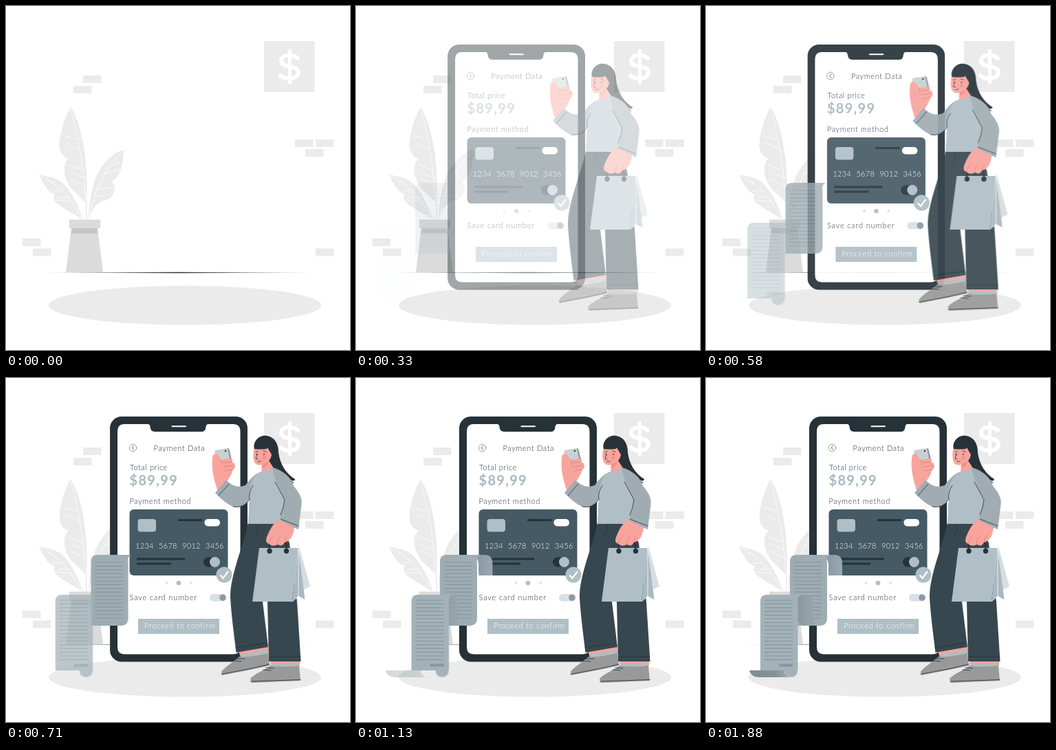
Recreate the animation shown at these times as an HTML page. Size 500 by 500 pixels, loop 1.93 s.

```html
<!DOCTYPE html>
<html lang="en">
<head>
<meta charset="utf-8">
<title>Payment</title>
<style>
html, body { margin: 0; width: 100%; height: 100%; overflow: hidden; background: #fff; }
svg { display: block; width: 100vw; height: 100vh; }
text { font: 300 11px Lato, "Open Sans", sans-serif; fill: #263238; }
.pale { fill: #ebebeb; }
.dark { fill: #263238; }
.blue { fill: #b0bec5; }
.skin { fill: #f8a49c; }
.paper { fill: #a3b2b9; }
.ink { fill: none; stroke: #263238; stroke-linecap: round; stroke-linejoin: round; stroke-width: .8; }
.vein { fill: none; stroke: #fff; stroke-width: .7; stroke-linecap: round; }
.rows { fill: none; stroke: #8797a0; stroke-width: 1.2; }
</style>
</head>
<body>
<svg viewBox="0 0 500 500">
  <defs>
    <linearGradient id="floor">
      <stop offset="0" stop-color="#263238" stop-opacity=".3"/>
      <stop offset=".5" stop-color="#263238"/>
      <stop offset="1" stop-color="#263238" stop-opacity=".3"/>
    </linearGradient>
    <linearGradient id="fold">
      <stop offset="0" stop-color="#84929a"/>
      <stop offset="1" stop-color="#9aa9b1"/>
    </linearGradient>
    <linearGradient id="roll">
      <stop offset="0" stop-color="#7d8b93"/>
      <stop offset=".6" stop-color="#83929a"/>
      <stop offset="1" stop-color="#a4b3ba"/>
    </linearGradient>
  </defs>

  <g id="bricks" class="pale"></g>
  <path class="pale" d="M375 51h73.500v74h-73.500z"/>
  <g fill="none" stroke="#fff" stroke-width="6" stroke-linecap="round">
    <path d="M424 76C416 69 400 70 400 80C400 91 425 85 425 96C425 107 407 108 399 101"/>
    <path stroke-width="5" d="M412.500 65V111"/>
  </g>
  <ellipse class="pale" cx="260" cy="435" rx="198" ry="28.500"/>

  <g id="plant">
    <path class="pale" d="M94 147C83 165 76 195 78 207C80 217 86 220 91 222C83 228 83 245 90 257C95 270 109 275 117 288C119 260 117 220 110 190C106 170 99 155 94 147"/>
    <path class="pale" d="M48 245C56 262 62 272 71 273Q67 277 72 285C85 296 100 302 112 311C104 285 90 262 78 254C68 248 56 247 48 245"/>
    <path class="pale" d="M171 209C155 213 138 230 130 250C124 270 120 290 120 311C124 295 132 285 145 282C153 280 158 273 158 262Q152 255 158 252C166 246 171 228 171 209"/>
    <path fill="none" stroke="#ebebeb" stroke-width="1.500" d="M117 284V312"/>
    <path class="vein" d="M94 150C104 185 114 235 116 290M83 188L103 194M88 199L107 208M91 231L113 239M94 251L115 262M96 242L114 250"/>
    <path class="vein" d="M50 247C75 257 98 284 110 309M68 269L83 268M72 282L96 284M75 278L92 278M62 254L71 257"/>
    <path class="vein" d="M169 212C145 232 127 272 121 306M142 244L165 237M146 236L166 226M132 267L155 263M129 277L148 275"/>
    <path fill="#dbdbdb" d="M92 310.500h45v12.500h-45zM95 322h38l8 65H87z"/>
    <path fill="#c5c5c5" d="M96 323h36l1.500 7.500H94.500z"/>
  </g>
  <path fill="url(#floor)" d="M55 387.500L250 386.700L445 387.500L250 388.300z"/>

  <g id="phone">
    <rect class="dark" x="150" y="56" width="200" height="356.500" rx="17"/>
    <path fill="#fff" d="M171 67H205Q208 67 208.500 71Q209 78 215 78H284Q289 78 289.500 71Q290 67 293 67H329Q339.500 67 339.500 78V391Q339.500 401.500 329 401.500H171Q161 401.500 161 391V78Q161 67 171 67z"/>
    <path d="M240.500 70.300H260" stroke="#fff" stroke-width="2" stroke-linecap="round"/>
    <circle class="ink" cx="183.500" cy="101.500" r="5.300" style="stroke:#78868d"/>
    <path class="ink" d="M184.800 98.800L182 101.500L184.800 104.200"/>
    <text x="213.500" y="105.500" letter-spacing=".65">Payment Data</text>
    <text x="179" y="133.500" letter-spacing=".55">Total price</text>
    <text x="178.500" y="155.500" letter-spacing="1.300" style="font-size:20px;font-weight:700;fill:#a9b8c0">$89,99</text>
    <text x="178.500" y="183" letter-spacing=".62">Payment method</text>
    <rect x="178.500" y="191" width="143" height="96" rx="6" fill="#455a64"/>
    <rect class="blue" x="190.500" y="205" width="26.500" height="18.500" rx="4"/>
    <rect x="287.500" y="205" width="22.500" height="10.500" rx="5" fill="#fff"/>
    <path class="ink" style="stroke-width:3;stroke-linecap:butt" d="M249 206.500H284M189 263H259M189 270H239"/>
    <text x="187" y="247.500" letter-spacing=".3" word-spacing="4" style="fill:#fff">1234 5678 9012 3456</text>
    <rect class="dark" x="286" y="260.500" width="24" height="14" rx="7"/>
    <circle class="blue" cx="302.500" cy="267.500" r="7.500"/>
    <circle class="blue" cx="316" cy="286" r="11.500"/>
    <path d="M310.500 286.500L314.500 291L322 281" fill="none" stroke="#fff" stroke-width="2.200"/>
    <circle fill="#e3e6e8" cx="232.500" cy="298" r="2.300"/>
    <circle class="blue" cx="250" cy="298" r="3.300"/>
    <circle fill="#e3e6e8" cx="268" cy="298" r="2.300"/>
    <text x="178.500" y="323" letter-spacing=".85">Save card number</text>
    <rect x="295" y="314" width="24" height="10.500" rx="5.200" fill="#d9e0e4"/>
    <circle cx="314" cy="319.200" r="4.800" fill="#8b9ba3"/>
    <path class="blue" d="M191 350h118v22H191z"/>
    <text x="200" y="364" letter-spacing=".7" style="fill:#fff">Proceed to confirm</text>
  </g>

  <g id="receipt">
    <path id="topFold" fill="url(#fold)" d="M166 257H188Q198 258 198 270V287H178V270Q177 260 166 257z"/>
    <g id="backPage">
      <path fill="#9eacb3" d="M131 257H180Q174 260 176 270V349Q176 360 165 360H122V267Q122 257 131 257z"/>
      <path class="rows" id="backRows"/>
    </g>
    <path id="midFold" fill="url(#fold)" d="M122 315H146Q155 316 156 328V352Q156 358 161 360H143Q134 358 133 350V326Q131 317 122 315z"/>
    <path id="scroll" fill="url(#roll)" d="M63 425H114Q115 434 124 435H76Q65 434 63 425z"/>
    <g id="frontPage">
      <path class="paper" d="M88 315H138Q132 318 133.500 327V424Q133 435 123 435Q114 434 114 425H79V325Q79 315 88 315z"/>
      <path d="M114 425Q115 433 123 434.500Q132 434 133 424" fill="none" stroke="#c0cbd0" stroke-width=".8"/>
      <path class="rows" id="frontRows"/>
      <path d="M106 417.500H126" stroke="#8797a0" stroke-width="4"/>
    </g>
  </g>

  <g id="woman">
    <path class="dark" d="M361 101C359 91 367 82 378 84C390 86 395 96 395 108C397 125 406 139 419 147C419 150 415 150 412 148Q417 152 418 153C402 150 387 139 379 126z"/>
    <path class="skin" d="M361 97C358 106 357 117 360.500 123Q364 128 371 126L370 137Q381 138 388 131L381 120Q387 114 384 104L377 97z"/>
    <path fill="#f28f89" d="M371 126L381 121Q378 129 370.500 131z"/>
    <path class="dark" d="M360 103C357 91 368 83 378 85C389 87 391 102 387 114L383 108L379 101L378 103Q368 104 360 103z"/>
    <path class="ink" d="M362 107.500L365 107M373 106L377 107.500M364.500 111Q361.500 115 362.500 117.500L365 118M365 121.500Q368 122.500 369.500 120.500"/>
    <circle class="dark" cx="363.500" cy="111" r=".9"/>
    <circle class="dark" cx="374" cy="111" r=".9"/>
    <circle cx="374" cy="116" r="2.500" fill="#f28f89"/>

    <path fill="#c9d0d3" d="M303 105L321 102Q323 102 323.500 104L327 119L311 123L302 108z"/>
    <path fill="#8f9ba1" d="M321 102Q323 102 323.500 104L327 119L324.500 119.500z"/>
    <circle class="dark" cx="318" cy="106" r="1.200"/>
    <path class="skin" d="M299 117C299 109 305 108 308 113L312 119L326 117Q330 119 327 122Q333 124 331 127Q334 130 329 133Q325 145 319 151L307 167C304 153 297 140 299 117z"/>
    <path class="ink" style="stroke:#d97f7a" d="M315 123L327 122M316 129L331 127M317 135L329 133M312 119Q315 123 313 127"/>

    <path class="skin" d="M337 397L380 390L381 401L340 406zM383 410H426V418H384z"/>
    <path fill="#37474f" d="M351 210H398L411 240L422 325L427.500 412H381L379 325H372L380 391L333.500 399C330 370 326 340 325 318C325 285 344 245 351 210z"/>
    <path class="ink" d="M365 214Q365 225 360 231M333 392L378 385M382 405H427"/>
    <path fill="#b4bcc0" d="M339 402L380 394V403L342 410zM384 414H425V421H384z"/>
    <path fill="#999" d="M312 427C317 420 329 413 338 405Q349 407 380 400L382 418L354 424L313 432z"/>
    <path fill="#999" d="M354 437C361 429 375 425 383 418Q400 421 425 418L427 440L356 443z"/>
    <path class="ink" d="M312 430.500L354 422.500L382 416M354.500 441L427 438.500M330 411L341 412M334 408L346 408M373 424L384 425M377 421L388 422"/>

    <path fill="#a0acb2" d="M303 167L319 148Q331 162 347 156C354 146 362 138 371 136Q381 136 386 130C402 134 414 145 417 157C425 166 430 175 428.500 184L424 220L396 208L399 196V212H351L353 177Q342 191 329 187Q317 182 303 167z"/>
    <path class="blue" d="M351 212L353 177Q350 164 358 147Q364 138 371 136Q381 136 386 130Q390 152 404 177Q403 188 398 199L399 212z"/>
    <path class="ink" d="M353 177Q351 166 358 156M390 151Q398 166 404 177Q403 188 398 199M308 171L323 154M398 205L424 215M329 187Q343 190 352 178"/>

    <path fill="#d6dde0" d="M424 241L441 303L431 308z"/>
    <path class="blue" d="M367 247H424L415 325H357z"/>
    <path fill="#aab8bf" d="M424 247L433.500 322L424 317L415 325z"/>
    <path d="M424 247L424 317L433.500 324M424 317L415 325" fill="none" stroke="#fff" stroke-width=".8"/>
    <path class="ink" style="stroke-width:2" d="M382 251Q380 242 386 238M406 251Q408 242 403 238"/>
    <path class="skin" d="M394 206L418 217C417 229 412 237 404 239Q400 246 394 242Q386 246 381 241Q375 239 378 231Q384 215 394 206z"/>
    <path class="ink" style="stroke:#d97f7a" d="M381 241Q383 233 388 229M393 242Q393 236 397 231M404 239L406 231"/>
    <circle class="dark" cx="382" cy="251.500" r="3.700"/>
    <circle class="dark" cx="406.500" cy="251.500" r="3.700"/>
  </g>
</svg>
<script>
const $ = id => document.getElementById(id);

const bricks = [[112, 101], [98, 116], [420, 194], [450, 194], [435, 208], [24, 338], [39, 352.5], [450, 352.5]];
$('bricks').innerHTML = bricks.map(([x, y]) => `<rect x="${x}" y="${y}" width="26.500" height="11"/>`).join('');

// Printed rows on a page
function rows(id, x, y, width, count) {
  const d = Array.from({ length: count }, (_, i) => `M${x} ${y + i * 5.4}h${width}`);
  $(id).setAttribute('d', d.join(''));
}
rows('backRows', 128, 268, 40, 16);
rows('frontRows', 85, 323, 41, 17);

// Every part slides in from the left with the same overshoot
const delays = {
  phone: -20, woman: -20, receipt: -20,
  backPage: 10, frontPage: 220, topFold: 430, midFold: 620, scroll: 820
};
const slides = Object.entries(delays).map(([id, delay]) => {
  const slide = $(id).animate(
    { opacity: [0, 1], transform: ['translateX(-30px)', 'translateX(0px)'] },
    { duration: 1000, delay, easing: 'cubic-bezier(.36, -.01, .5, 1.38)', fill: 'both' }
  );
  slide.pause();
  return slide;
});

const LOOP = 1930, STEP = 1000 / 24;
const start = performance.now();

function draw() {
  const time = (performance.now() - start) % LOOP;
  const tick = Math.floor((time + 4) / STEP) * STEP;
  for (const slide of slides) slide.currentTime = tick;
  requestAnimationFrame(draw);
}
draw();
</script>
</body>
</html>
```
